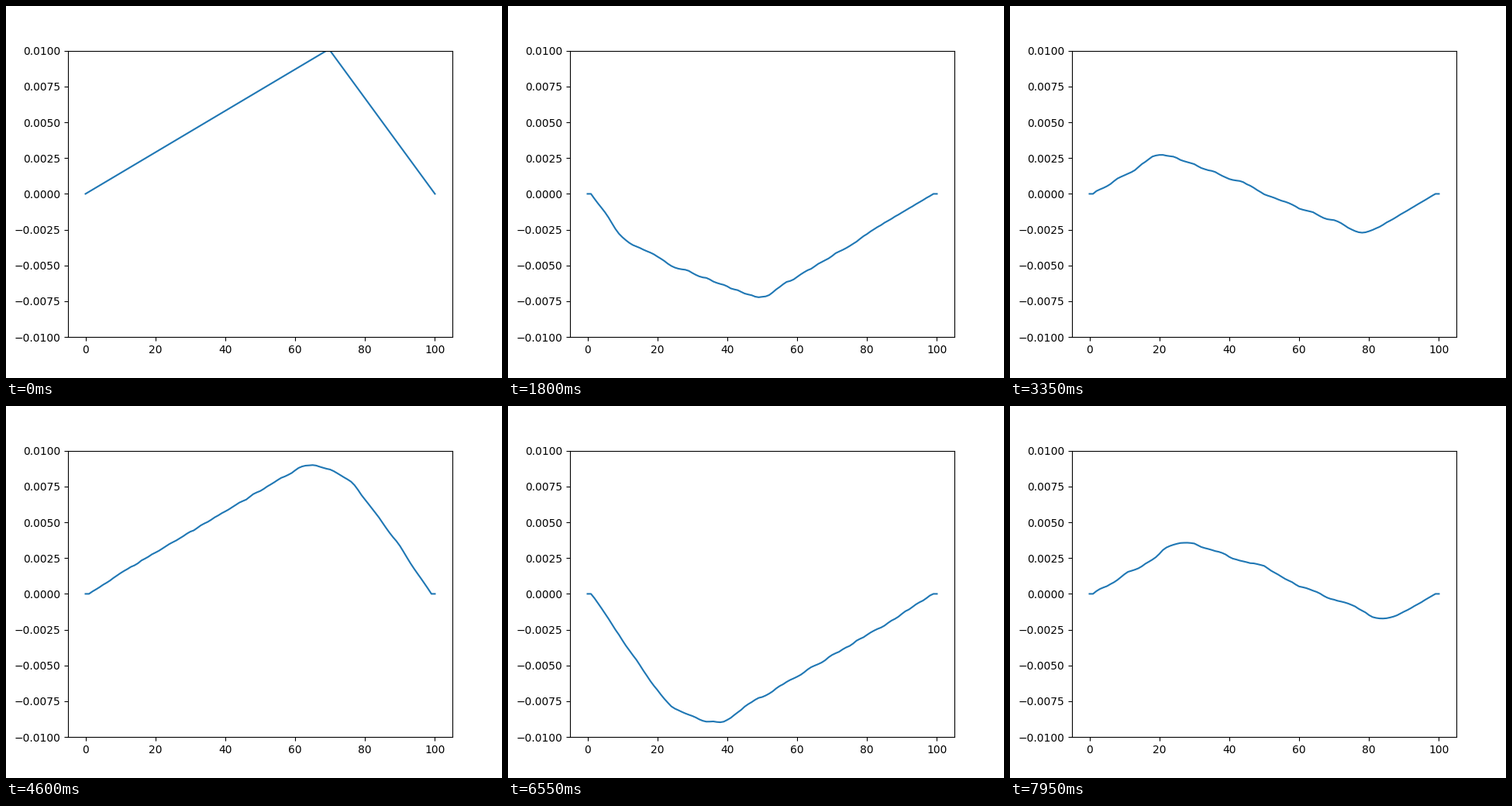
A matplotlib script for the animation above (8000 ms loop, 640 px wide and 480 px high).

```python
import numpy as np
import matplotlib.pyplot as plt
from matplotlib.animation import FuncAnimation

# String: points, length (m), base pitch (Hz), stiffness and damping
POINTS = 101
LENGTH = 0.7
PITCH = 220
STIFFNESS = 2e-6
DAMPING = 2.6e-5

DX = LENGTH / (POINTS - 1)
DT = 5e-6
SPEED = 2 * LENGTH * PITCH

FRAMES = 160
INTERVAL = 50
STEPS_PER_FRAME = 10


def pluck():
    """Triangular shape of the string before release."""
    return np.concatenate([np.linspace(0, 0.01, 70),
                           np.linspace(0.01, 0, POINTS - 70)])


def advance(prev, cur):
    """One finite-difference step of the stiff, damped wave equation."""
    inertia = 1 / (SPEED * DT) ** 2
    drag = DAMPING / (2 * DT)
    mid = cur[2:-2]
    bend = (cur[1:-3] - 2 * mid + cur[3:-1]) / DX ** 2
    stiff = STIFFNESS ** 2 / DX ** 4 * (
        cur[4:] - 4 * cur[3:-1] + 6 * mid - 4 * cur[1:-3] + cur[:-4])
    new = np.zeros_like(cur)
    new[2:-2] = (bend - stiff + inertia * (2 * mid - prev[2:-2])
                 + drag * prev[2:-2]) / (inertia + drag)
    return new


def simulate():
    """Shape of the string at every displayed frame."""
    prev, cur = pluck(), pluck()
    shapes = [prev]
    for step in range(2, (FRAMES - 1) * STEPS_PER_FRAME + 1):
        prev, cur = cur, advance(prev, cur)
        if step % STEPS_PER_FRAME == 0:
            shapes.append(cur)
    return shapes


shapes = simulate()

fig, ax = plt.subplots(figsize=(6.4, 4.8), dpi=100)
line, = ax.plot(shapes[0])
ax.set_xlim(-5, 105)
ax.set_ylim(-0.01, 0.01)


def draw(frame):
    line.set_ydata(shapes[frame])
    return line,


anim = FuncAnimation(fig, draw, frames=FRAMES, interval=INTERVAL,
                     init_func=lambda: draw(0), repeat=True, repeat_delay=0)
plt.show()
```
